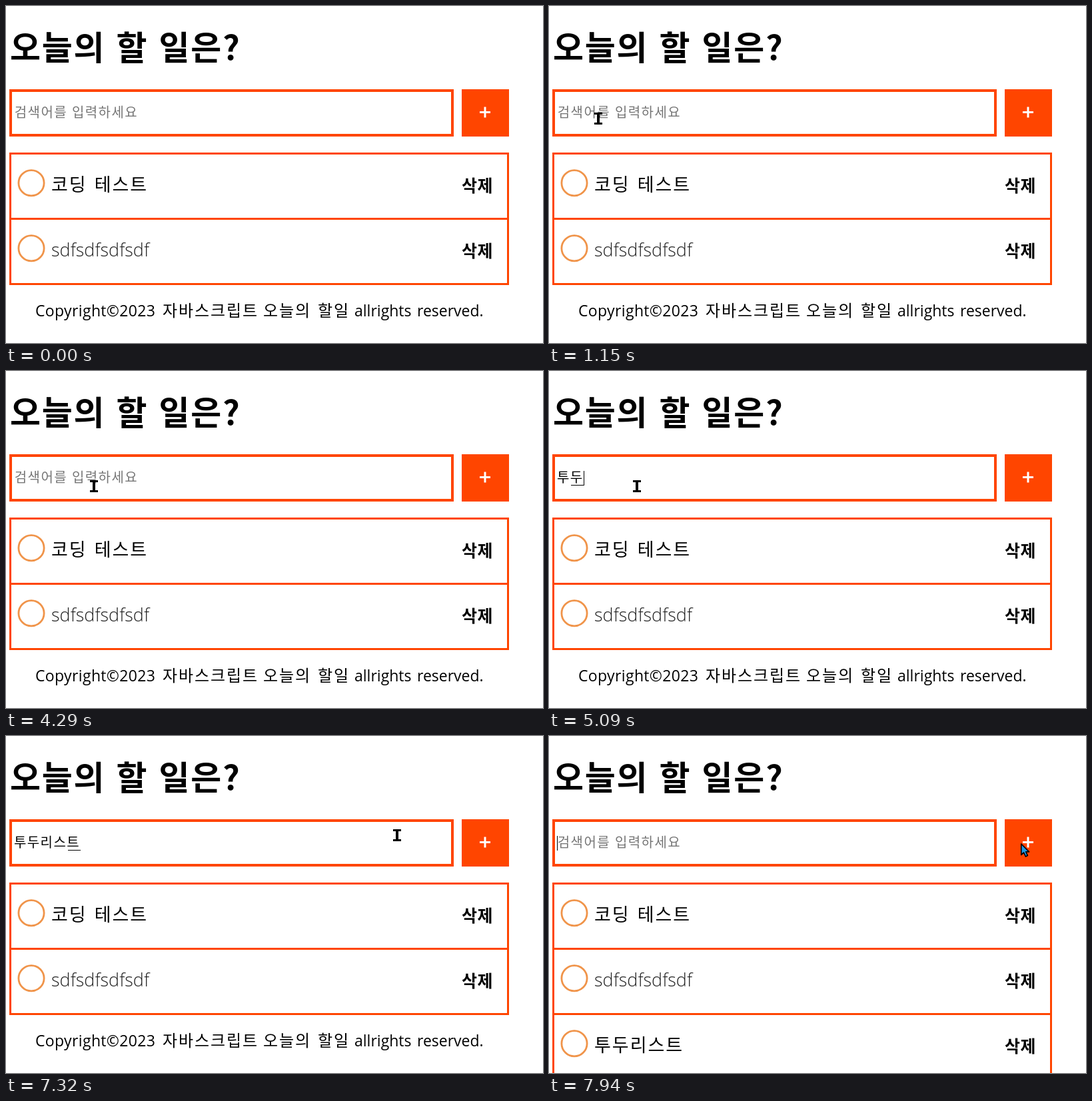
An HTML page that plays this animation: 806 by 506 pixels, repeating every 8 s.

```html
<!DOCTYPE html>
<html lang="ko">
<head>
<meta charset="utf-8">
<title>오늘의 할 일은?</title>
<style>
  html, body { margin: 0; width: 100%; height: 100%; overflow: hidden; background: #fff; }
  svg { display: block; }
  text { font-family: "Noto Sans CJK KR", "Noto Sans CJK", sans-serif; white-space: pre; }
  .title { font-size: 50px; font-weight: 700; letter-spacing: 1.8px; word-spacing: .3px; }
  .field { font-size: 20px; font-weight: 300; letter-spacing: 1.4px; }
  .item { font-size: 27px; font-weight: 300; letter-spacing: 2px; word-spacing: 1.4px; }
  .del { font-size: 25px; font-weight: 700; letter-spacing: .5px; }
  .foot { font-size: 24px; font-weight: 350; letter-spacing: 1.9px; }
  .latin { font-family: "Open Sans", "Noto Sans", sans-serif; letter-spacing: 0; }
  .item.latin { font-size: 27px; fill: #222; }
  .foot .latin { font-size: 23px; font-weight: 400; }
  .line { fill: none; stroke: #ff4500; stroke-width: 3; }
</style>
</head>
<body>
<svg width="806" height="506" viewBox="0 0 806 506">
  <defs>
    <g id="row">
      <rect class="line" x="6.5" y="221.5" width="747" height="98"/>
      <circle cx="38" cy="265.7" r="19.1" fill="none" stroke="#f0944a" stroke-width="2.8"/>
      <text class="del" x="684" y="278.5">삭제</text>
    </g>
  </defs>

  <text class="title" x="6" y="81">오늘의 할 일은?</text>

  <rect class="line" x="7" y="127" width="663" height="67" style="stroke-width:4"/>
  <text class="field" id="hint" x="12.8" y="167" fill="#757575">검색어를 입력하세요</text>
  <text class="field" id="typed" x="12" y="167"></text>
  <rect id="under" y="171" width="19" height="1"/>
  <rect id="caret" y="150" width="1" height="22"/>

  <rect x="684" y="125" width="71" height="71" fill="#ff4500"/>
  <path d="M711 159.5h16M719 151.5v16" stroke="#fff" stroke-width="3"/>

  <use href="#row"/>
  <text class="item" x="68" y="278">코딩 테스트</text>
  <use href="#row" y="98"/>
  <text class="item latin" x="68" y="376">sdfsdfsdfsdf</text>
  <g id="added">
    <use href="#row" y="196"/>
    <text class="item" x="68" y="474">투두리스트</text>
  </g>

  <text class="foot" id="foot" y="466"><tspan class="latin" x="44" style="letter-spacing:.35px">Copyright©2023</tspan><tspan x="235">자바스크립트</tspan><tspan x="386">오늘의</tspan><tspan x="468">할일</tspan><tspan class="latin" x="523">allrights</tspan><tspan class="latin" x="617">reserved.</tspan></text>

  <path id="beam" d="M-6 -9H6V-6H2V6H6V9H-6V6H-2V-6H-6Z"/>
  <path id="arrow" d="M.8 1V17.5L4.6 14L7.4 20L10.4 18.6L7.8 12.8H12.6Z" fill="#1c9ae6" stroke="#000" stroke-width="1.7" stroke-linejoin="round"/>
</svg>
<script>
  const LOOP = 8000;
  const $ = id => document.getElementById(id);
  const show = (id, on) => $(id).style.display = on ? '' : 'none';

  // [time, text in the field, caret visible]
  const typing = [
    [0, '', 0], [1350, '', 1], [1880, '', 0], [2410, '', 1], [2960, '', 0], [3490, '', 1],
    [3620, 'ㅌ', 1], [3690, '투', 1], [4150, 'ㅌ', 1], [4220, '', 1], [4290, '', 0],
    [4700, '', 1], [4770, 'ㅌ', 1], [4900, '투', 1], [4960, '툳', 1], [5090, '투두', 1],
    [5420, '투둘', 1], [5620, '투두리', 1], [5880, '투두릿', 1], [5950, '투두리스', 1],
    [6220, '투두리스트', 1], [6770, '투두리스트', 0], [7390, '투두리스트', 1],
    [7740, '', 0], [7940, '', 1]
  ];

  const enter = [[120, 613, 439], [424, 180, 306], [652, 84, 212], [880, 74, 178]];
  const leave = [[6900, 132, 173], [7110, 367, 190], [7320, 587, 149], [7600, 708, 161]];
  const rests = [[880, 74, 178], [1010, 74, 174], [1080, 74, 171], [1150, 74, 169],
    [1350, 80, 172], [1490, 68, 166], [1560, 104, 170], [1620, 132, 173]];

  const last = (list, t) => list.filter(k => k[0] <= t).pop();

  function along(path, t) {
    const i = path.findIndex(k => k[0] > t);
    if (i < 0) return path[path.length - 1].slice(1);
    const a = path[i - 1], b = path[i], p = (t - a[0]) / (b[0] - a[0]);
    return [a[1] + (b[1] - a[1]) * p, a[2] + (b[2] - a[2]) * p];
  }

  const stepped = (t, start, step) => start + Math.floor((t - start) / step) * step;

  function pointer(t) {
    if (t < 120) return null;
    if (t < 880) return along(enter, stepped(t, 120, 76));
    if (t < 6970) return last(rests, t).slice(1);
    return along(leave, stepped(t, 6970, 70));
  }

  function draw(t) {
    const [, text, caret] = last(typing, t), n = text.length;
    $('typed').textContent = text;
    show('hint', !n);
    show('under', n);
    show('caret', caret);
    $('under').setAttribute('x', 20 * n - 7);
    $('caret').setAttribute('x', 12 + 20 * n);

    const added = t >= 7810;
    show('added', added);
    $('foot').setAttribute('y', added ? 564 : 466);

    const p = pointer(t);
    const inField = p && p[0] < 672 && p[1] < 196;
    show('beam', inField);
    show('arrow', p && !inField);
    if (p) $(inField ? 'beam' : 'arrow').setAttribute('transform', `translate(${p.map(Math.round)})`);
  }

  const begin = performance.now();
  function tick() {
    draw((performance.now() - begin) % LOOP);
    requestAnimationFrame(tick);
  }
  tick();
</script>
</body>
</html>
```
